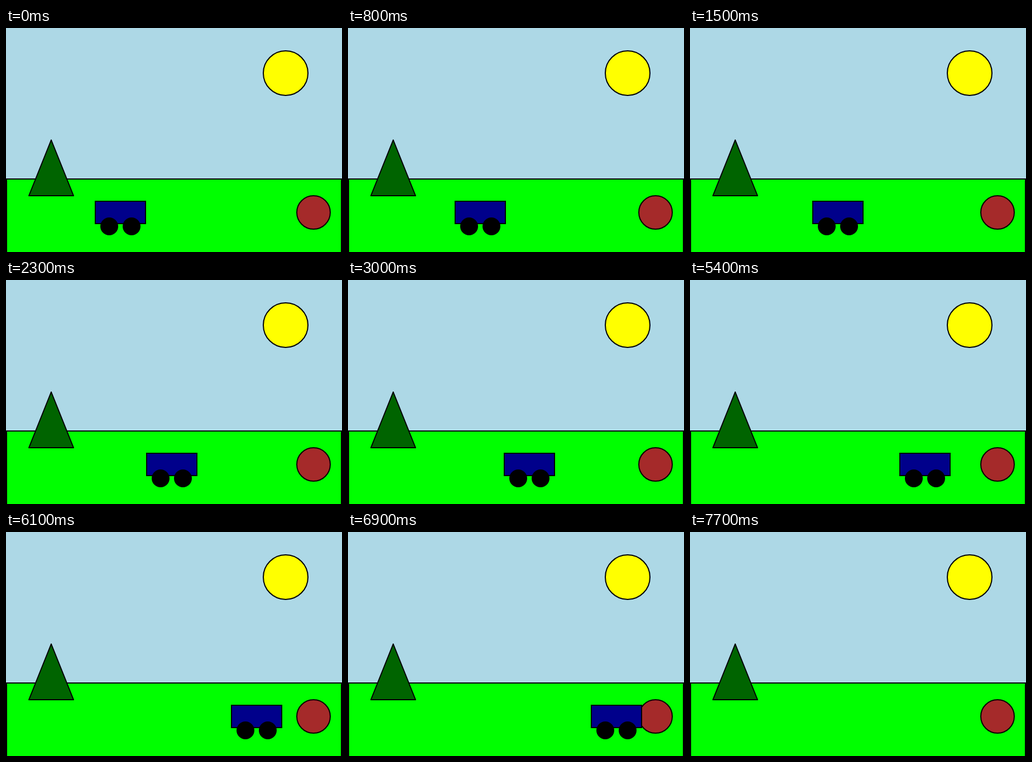
These frames come from a looping animation (602x402 px, 8 s). An HTML page with a canvas:

```html
<!DOCTYPE html>
<html lang="en">
<head>
<meta charset="utf-8">
<title>Truck ride</title>
<style>
  html, body { margin: 0; width: 100%; height: 100%; overflow: hidden; background: #add8e6; }
  canvas { display: block; }
</style>
</head>
<body>
<canvas id="stage" width="602" height="402"></canvas>
<script>
const ctx = document.getElementById('stage').getContext('2d');
const LOOP = 8000, STEP = 100;
const RIDE_STEPS = 69;                // level driving, 4 px per step
const PIVOT = { x: 283, y: 1 };       // the truck swings up around this point
const ARM = { x: 198, y: 330 };       // pivot to truck centre

function paint(fill) {
  ctx.fillStyle = fill;
  ctx.fill();
  ctx.stroke();
}

function rect(x, y, w, h, fill) {
  ctx.beginPath();
  ctx.rect(x, y, w, h);
  paint(fill);
}

function circle(x, y, r, fill) {
  ctx.beginPath();
  ctx.arc(x, y, r, 0, Math.PI * 2);
  paint(fill);
}

function tree() {
  ctx.beginPath();
  ctx.moveTo(81, 201);
  ctx.lineTo(121, 301);
  ctx.lineTo(41, 301);
  ctx.closePath();
  ctx.lineJoin = 'round';
  paint('#006400');
  ctx.lineJoin = 'miter';
}

// Degrees of swing, n steps after the level ride ends
function swing(n) {
  return n <= 3 ? n * 20 / 3 : 20 + (n - 3) * 5;
}

function truckPose(step) {
  if (step <= RIDE_STEPS) return { x: 205 + 4 * step, y: 331, a: 0 };
  const deg = swing(step - RIDE_STEPS);
  const a = deg * Math.PI / 180, c = Math.cos(a), s = Math.sin(a);
  return {
    x: PIVOT.x + Math.min(deg, 20) * 0.1 + ARM.x * c + ARM.y * s,
    y: PIVOT.y - ARM.x * s + ARM.y * c,
    a
  };
}

function truck({ x, y, a }) {
  ctx.save();
  ctx.translate(x, y);
  ctx.rotate(-a);
  rect(-45, -20, 90, 40, '#00008b');
  circle(-20, 25, 15, '#000');
  circle(20, 25, 15, '#000');
  ctx.restore();
}

function draw(t) {
  const step = Math.floor(t / STEP);
  ctx.lineWidth = 2;
  ctx.strokeStyle = '#000';
  ctx.fillStyle = '#add8e6';
  ctx.fillRect(0, 0, 602, 402);
  circle(501, 81, 40, '#ffff00');
  rect(1, 271, 600, 200, '#00ff00');
  tree();
  circle(551, 331, 30, '#a52a2a');
  if (step < 77) truck(truckPose(step));
}

const start = performance.now();
function tick() {
  draw((performance.now() - start) % LOOP);
  requestAnimationFrame(tick);
}
tick();
</script>
</body>
</html>
```
